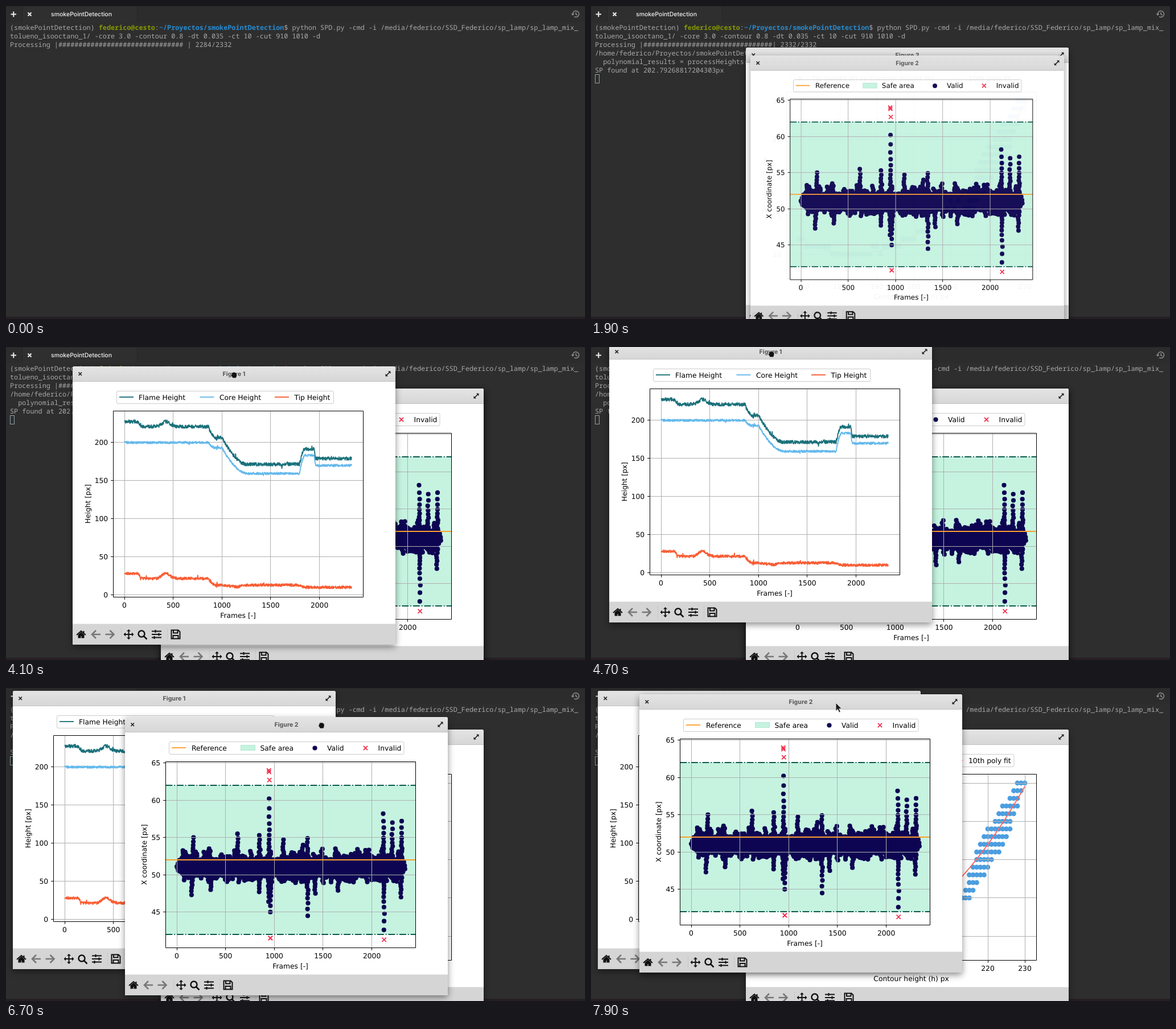
Animation of 1017 by 550 pixels, one loop 8000 ms. Source, as an HTML page:

```html
<!DOCTYPE html>
<html lang="en">
<head>
<meta charset="utf-8">
<title>Smoke point detection</title>
<style>
html, body { margin: 0; width: 100%; height: 100%; overflow: hidden; background: #2e2e2e; }
svg { display: block; width: 100vw; height: 100vh; }
text { text-rendering: geometricPrecision; white-space: pre; }
.term { font: 11.81px "Noto Sans Mono", monospace; fill: #a8a8a8; }
.term .user { font-weight: 700; fill: #859900; }
.term .path { font-weight: 700; fill: #268bd2; }
.tab { font: 500 10.5px Inter, sans-serif; fill: #f2f2f2; }
.title { font: 700 10.6px Inter, sans-serif; fill: #555; text-anchor: middle; }
.plot { font: 12.3px "DejaVu Sans", sans-serif; fill: #000; }
.mid { text-anchor: middle; }
.end { text-anchor: end; }
.grid { stroke: #b0b0b0; fill: none; }
.axis { stroke: #000; fill: none; }
.shadow { filter: drop-shadow(0 4px 6px rgba(0, 0, 0, .45)); }
.line { fill: none; stroke-width: 1.85; stroke-linejoin: round; }
.dots { fill: none; stroke-linecap: round; }
</style>
</head>
<body>
<svg viewBox="0 0 1017 550" preserveAspectRatio="none">
  <defs>
    <linearGradient id="bar" x2="0" y2="1">
      <stop stop-color="#e4e4e4"/><stop offset="1" stop-color="#d6d6d6"/>
    </linearGradient>
  </defs>
  <rect width="1017" height="550" fill="#2e2e2e"/>
  <rect width="1017" height="28" fill="#2c2c2c"/>
  <rect x="28" width="203" height="28" fill="#2f2f2f"/>
  <path d="M0 .5H1017M28.5 1V28M230.5 1V28" stroke="#262626" fill="none"/>
  <rect y="546" width="1017" height="4" fill="#261f23"/>
  <path d="M8.5 14.5H18M13.25 9.75V19.25M38.5 11.5l6 6m0 -6l-6 6" stroke="#eee" stroke-width="2" fill="none"/>
  <text class="tab" x="79" y="18">smokePointDetection</text>
  <g stroke="#8d8d8d" stroke-width="1.5" fill="none">
    <path d="M995.5 14.5A5.5 5.5 0 1 1 998 18.700M1001 11V14.5L1003.5 16"/>
    <path d="M992.5 13.5h6L995.5 17Z" fill="#8d8d8d" stroke="none"/>
  </g>
  <g class="term" id="term"></g>
  <g id="stage"></g>
  <g id="cursor">
    <path id="arrow" d="M0 0V14.5L3.4 11.4L5.8 17L8.3 15.9L5.9 10.5H10.3Z" fill="#1c1c1c" stroke="#eee" stroke-width=".9"/>
    <path id="hand" d="M-4 -2.5Q-3.500 -5 -2 -3.800Q-1 -6 .3 -4.300Q2 -5.500 2.800 -3.500Q5 -4 5 -1.500V1.500Q4.800 3 3.500 5.500H-2.500Q-3 3.500 -5 1.500Q-6 -.5 -4 -.5Z" fill="#111" stroke="#ddd" stroke-width=".6"/>
  </g>
</svg>
<script>
const $ = id => document.getElementById(id);
const LOOP = 8000, STEP = 100;

let seed = 7;
const rnd = () => (seed = (seed * 16807) % 2147483647) / 2147483647;
const clamp = v => Math.max(0, Math.min(1, v));
const range = (from, to, step) => Array.from({ length: Math.floor((to - from) / step) + 1 }, (_, i) => from + i * step);

// Linear interpolation over rows of [key, ...values]
function at(keys, t) {
  let i = 0;
  while (i < keys.length - 2 && t > keys[i + 1][0]) i++;
  const [a, b] = [keys[i], keys[i + 1]];
  const p = clamp((t - a[0]) / (b[0] - a[0]));
  return a.slice(1).map((v, k) => v + (b[k + 1] - v) * p);
}

const text = (x, y, s, cls = '', more = '') => `<text x="${x}" y="${y}" class="${cls}" ${more}>${s}</text>`;
const path = (d, color, more = '') => `<path d="${d}" stroke="${color}" ${more}/>`;
const line = (pts, color) =>
  path('M' + pts.map(([x, y]) => `${x.toFixed(1)} ${y.toFixed(1)}`).join('L'), color, 'class="line"');
const dots = (pts, color, size) =>
  path(pts.map(([x, y]) => `M${x.toFixed(1)} ${y.toFixed(1)}h0`).join(''), color, `class="dots" stroke-width="${size}"`);
const crosses = (pts, color) =>
  path(pts.map(([x, y]) => `M${x - 3.6} ${y - 3.6}l7.2 7.2m0 -7.2l-7.2 7.2`).join(''), color, 'stroke-width="1.8" fill="none"');

// Axes box inside a window
const L = 71.5, R = 510.5, T = 78.5, B = 405.5, MIDX = 290.6, MIDY = 241.7;
const snap = v => Math.floor(v) + .5;

function plot({ xs, ys, fx, fy, xlabel, ylabel, labelX, back = '', front, legend, right }) {
  let grid = '', ticks = '', labels = '';
  for (const v of xs) {
    grid += `M${snap(fx(v))} ${T}V${B}`;
    ticks += `M${snap(fx(v))} ${B}v4.3`;
    labels += text(fx(v), 424, v, 'mid');
  }
  for (const v of ys) {
    grid += `M${L} ${snap(fy(v))}H${R}`;
    ticks += `M${L} ${snap(fy(v))}h-4.3`;
    labels += text(62.2, fy(v) + 4.5, v, 'end');
  }
  return `<g class="plot">${back}<path class="grid" d="${grid}"/>${front}
    <path class="axis" d="M${L} ${T}H${R}V${B}H${L}Z${ticks}"/>${labels}
    ${text(MIDX, 441.5, xlabel, 'mid')}
    ${text(0, 0, ylabel, 'mid', `transform="translate(${labelX} ${MIDY}) rotate(-90)"`)}
    <rect x="77.5" y="43.5" width="${right - 77.5}" height="22" rx="2.5" fill="#fff" fill-opacity=".8" stroke="#ccc"/>
    ${legend}</g>`;
}

const legendLine = (x, color) => line([[x, 54], [x + 25, 54]], color);
const legendText = (x, s) => text(x, 58.5, s);
const frameX = f => 91 + f * .1713;
const frames = { xs: range(0, 2000, 500), fx: frameX, xlabel: 'Frames [-]' };

function heights() {
  const fy = v => 401.6 - v * 1.342;
  const ramp = (f, from, to) => 1 - (1 - clamp((f - from) / (to - from))) ** 1.7;
  const hump = f => Math.exp(-(((f - 425) / 55) ** 2));
  // Shared course of the experiment; each curve scales its stages
  const course = (f, base, [dip, rise, drop, fall, peak, settle]) => base - dip * ramp(f, 140, 190) + rise * hump(f) -
    drop * ramp(f, 860, 930) - fall * ramp(f, 1000, 1250) + peak * ramp(f, 1795, 1850) - settle * ramp(f, 1945, 1965);
  const flame = f => course(f, 227, [6.5, 6.5, 14.5, 35, 20, 12.5]);
  const core = f => course(f, 199.5, [0, 0, 7, 33.5, 23.5, 13]);
  const tip = f => course(f, 28, [6.5, 7, 8.5, 3, -2.8, 0]) + 2.8 * ramp(f, 1160, 1280);
  const trace = (curve, color, noise) => line(range(0, 2330, 2.5).map(f => {
    const burst = Math.abs(f - 948) < 8 || rnd() < .01 ? 2.5 : 1;
    return [frameX(f), fy(curve(f) + (rnd() - .5) * noise * burst)];
  }), color);
  const [teal, blue, orange] = ['#19707a', '#64b9ec', '#f95c33'];
  return plot({
    ...frames, ys: range(0, 200, 50), fy, ylabel: 'Height [px]', labelX: 31, right: 458.5,
    front: trace(flame, teal, 4.4) + trace(core, blue, 3) + trace(tip, orange, 3.6),
    legend: legendLine(82, teal) + legendText(116, 'Flame Height') +
      legendLine(223.5, blue) + legendText(258, 'Core Height') +
      legendLine(355, orange) + legendText(389.5, 'Tip Height')
  });
}

function coordinates() {
  const fy = v => 80.7 + (65 - v) * 13.1;
  const point = ([f, v]) => [frameX(f), fy(v)];
  const cloud = range(0, 2340, 3).map(f => [f, 51.1 + (rnd() - .5) * 2 * Math.min(1, f / 25, (2365 - f) / 60)]);
  // A column of points from its tip to the central band, sparse far away
  const column = (f, tip) => {
    const dir = Math.sign(tip - 51);
    for (let d = Math.abs(tip - 51); d > 0; d -= Math.max(.2, d * .14))
      cloud.push([f + (rnd() - .5) * 50 / (1 + d), 51 + dir * d]);
  };
  for (const f of range(60, 2290, 28)) {
    column(f, 52 + rnd() ** 2 * 1.5);
    column(f + 12, 50 - rnd() * 1.1);
  }
  // The outstanding columns
  [[155, 47.3], [168, 55], [330, 53.5], [350, 48], [625, 55.5], [845, 47.7], [850, 55.3], [948, 60.2], [940, 46.4],
    [960, 45], [1090, 54.7], [1290, 54], [1338, 54.9], [1342, 44.5], [1420, 47.5], [1630, 53.5], [1655, 47.9],
    [2119, 58.2], [2126, 42.6], [2209, 57], [2300, 47], [2307, 57.2]].forEach(c => column(...c));
  const bad = [[944, 64], [946, 63.8], [950, 62.7], [958, 41.5], [961, 41.5], [2126, 41.3]];
  const bounds = path(`M${L} ${fy(62)}H${R}M${L} ${fy(42)}H${R}`, '#0c5a4c',
    'class="line" stroke-dasharray="11.8 2.95 1.85 2.95"');
  const safe = '#c5f3e0', ref = '#ff9f2e', valid = '#0e0552', invalid = '#f2304e';
  return plot({
    ...frames, ys: range(45, 65, 5), fy, ylabel: 'X coordinate [px]', labelX: 38, right: 490,
    back: `<rect x="${L}" y="${fy(62)}" width="${R - L}" height="${fy(42) - fy(62)}" fill="${safe}"/>` +
      dots(cloud.map(point), valid, 8.2) + crosses(bad.map(point), invalid),
    front: line([[L, fy(52)], [R, fy(52)]], ref) + bounds,
    legend: legendLine(82, ref) + legendText(117, 'Reference') +
      `<rect x="203.5" y="49.5" width="25" height="9" fill="${safe}" stroke="#b4e6d2"/>` + legendText(237.5, 'Safe area') +
      dots([[333.5, 54.5]], valid, 8.2) + legendText(355, 'Valid') +
      crosses([[422.5, 54.5]], invalid) + legendText(444.5, 'Invalid')
  });
}

function polyFit() {
  const fx = v => 425 + (v - 220) * 6.5;
  const fy = v => 94 + (30 - v) * 13.45;
  const fit = h => 10 + ((h - 184) / 10.4) ** 2;
  const cloud = range(169, 212, 1).map(h => [h, Math.round(fit(h) + rnd() - .5)]);
  for (const t of range(15, 30, 1)) {
    const spread = 1 + 2.2 * Math.sin(Math.PI * (t - 15) / 15);
    for (const h of range(Math.ceil(199 + t - spread), 199 + t + spread, 1)) cloud.push([h, t]);
  }
  const blue = '#4c9ee0', red = '#ff6464';
  return plot({
    xs: range(170, 230, 10), ys: range(10, 30, 5), fx, fy,
    xlabel: 'Contour height (h) px', ylabel: 'Tip height (t) px', labelX: 38, right: 471,
    back: dots(cloud.map(([h, t]) => [fx(h), fy(t)]), blue, 8.8),
    front: line(range(169, 230, 1).map(h => [fx(h), fy(fit(h))]), red),
    legend: dots([[94.5, 54.5]], blue, 8.8) + legendText(116, 'Tip height (t) vs Contour height (h)') +
      legendLine(356, red) + legendText(391, '10th poly fit')
  });
}

const icon = (x, d, color, fill = 'none', width = 2) =>
  `<path transform="translate(${x} 471)" d="${d}" fill="${fill}" stroke="${color}" stroke-width="${width}"/>`;
const toolbar = () => `<rect y="452.5" width="567" height="36.5" fill="#d5d5d5"/>` +
  `<path d="M85.5 461V482M166.5 461V482" stroke="#bbb" stroke-dasharray="2 2"/>` +
  icon(15, 'M-8 1L0 -6L8 1M4.5 -6V-2', '#111') + icon(15, 'M-4.5 1L0 -3L4.5 1V5.5H1.5V2H-1.5V5.5H-4.5Z', '#111', '#111') +
  icon(41, 'M8 0H-6M0 -7L-7 0L0 7', '#777', 'none', 2.6) + icon(65.5, 'M-8 0H6M0 -7L7 0L0 7', '#777', 'none', 2.6) +
  icon(98.5, 'M-7 0H7M0 -7V7', '#111') +
  icon(98.5, 'M-9 0l3.5 -3.5v7ZM9 0l-3.5 -3.5v7ZM0 -9l-3.5 3.5h7ZM0 9l-3.5 -3.5h7Z', 'none', '#111') +
  icon(122, 'M4.5 -1A5.5 5.5 0 1 1 -6.5 -1A5.5 5.5 0 1 1 4.5 -1M3 3L8.5 8.5', '#111', 'none', 2.5) +
  icon(147.5, 'M-8.5 -5.5h17M-8.5 0h17M-8.5 5.5h17M-2 -8v5M4 -2.5v5M-4 3v5', '#111') +
  icon(181, 'M-7.5 -7.5H4.5L7.5 -4.5V7.5H-7.5ZM-4 -7V-2.5H3.5V-7M-4.5 7V2H4.5V7', '#111');

function makeWindow(name, body) {
  const g = document.createElementNS('http://www.w3.org/2000/svg', 'g');
  g.innerHTML = `<rect class="shadow" width="567" height="489" rx="3" fill="#fff"/>
    <path d="M0 27V4Q0 0 4 0H563Q567 0 567 4V27Z" fill="url(#bar)"/>
    <path d="M0 26.5H567" stroke="#c2c2c2"/>
    ${text(283.5, 17, name, 'title')}
    <path d="M10.5 10.5l5.5 5.5m0 -5.5l-5.5 5.5M550.5 16.5l7 -7" stroke="#222" stroke-width="1.7" fill="none"/>
    <path d="M554 8.5h4.5v4.5ZM549.5 13v4.5h4.5Z" fill="#222"/>
    ${body}${toolbar()}`;
  $('stage').append(g);
  return g;
}

const third = { open: 1550, keys: [[0, 272, 73], [LOOP, 272, 73]], node: makeWindow('Figure 3', polyFit()) };
const second = { open: 1800, keys: [[6300, 272, 73], [7100, 146, 28], [7700, 85, 11]],
  node: makeWindow('Figure 2', coordinates()) };
const first = { open: 1900, keys: [[3400, 272, 73], [3600, 232, 73], [4400, 48, 10], [4700, 32, -5], [5500, 12, 5]],
  node: makeWindow('Figure 1', heights()) };

// While a window is dragged the pointer sits at a grip on its title bar
const firstGrip = [[3400, 282, 13], [5800, 287, 21]];
const approach = [[2400, 494, 27], [2900, 568, 95], [3300, 560, 92]];
const crossing = [[5900, 299, 26], [6300, 616, 88]];

function pointer(t) {
  const grip = (win, [dx, dy]) => {
    const [x, y] = at(win.keys, t);
    return [x + dx, y + dy];
  };
  if (t < 3400) return { pos: at(approach, t), held: false };
  if (t < 6000) return { pos: grip(first, at(firstGrip, t)), held: true };
  if (t < 6300) return { pos: at(crossing, t), held: false };
  return { pos: grip(second, [345, 15]), held: t < 7800 };
}

function terminal(t) {
  const done = t >= 1000;
  const count = done ? 2332 : 2284 + Math.round(t / 20);
  const lines = [
    '(smokePointDetection) <tspan class="user">federico@cesto</tspan>:<tspan class="path">~/Proyectos/smokePointDetection</tspan>' +
      '$ python SPD.py -cmd -i /media/federico/SSD_Federico/sp_lamp/sp_lamp_mix_',
    'tolueno_isooctano_1/ -core 3.0 -contour 0.8 -dt 0.035 -ct 10 -cut 910 1010 -d',
    `Processing |${'#'.repeat(done ? 32 : 31).padEnd(32)}| ${count}/2332`
  ];
  if (t >= 1100) lines.push(
    '/home/federico/Proyectos/smokePointDetection/flame_functions.py:214: RankWarning: Polyfit may be poorly conditioned',
    '  polynomial_results = processHeights(heights, frames)');
  if (t >= 1200) lines.push('SP found at 202.79268817204303px');
  const caret = t >= 1200 ? '<rect x="7.5" y="120.5" width="7" height="15" fill="none" stroke="#8fa3a5"/>' : '';
  return lines.map((s, i) => text(7, 41.8 + i * 15.05, s)).join('') + caret;
}

let shown = '';
function render(t) {
  const out = terminal(t);
  if (out !== shown) $('term').innerHTML = shown = out;

  const top = t >= 6300 ? second : first;
  if ($('stage').lastChild !== top.node) $('stage').append(top.node);

  // Windows grow from their bottom edge as they open
  for (const { open, keys, node } of [third, second, first]) {
    const p = clamp((t - open) / 200);
    const s = .9 + .1 * Math.sin(p * Math.PI / 2);
    const [x, y] = at(keys, t).map(Math.round);
    node.style.display = p ? '' : 'none';
    node.setAttribute('opacity', Math.min(1, p * 1.92));
    node.setAttribute('transform', `translate(${x + 283.5 * (1 - s)} ${y + 489 * (1 - s)}) scale(${s})`);
  }

  const { pos, held } = pointer(t);
  $('cursor').style.display = t >= 2400 ? '' : 'none';
  $('cursor').setAttribute('transform', `translate(${pos})`);
  $('hand').style.display = held ? '' : 'none';
  $('arrow').style.display = held ? 'none' : '';
}

const start = performance.now();
function tick() {
  const t = (performance.now() - start) % LOOP;
  render(Math.floor(t / STEP) * STEP);
  requestAnimationFrame(tick);
}
tick();
</script>
</body>
</html>
```
